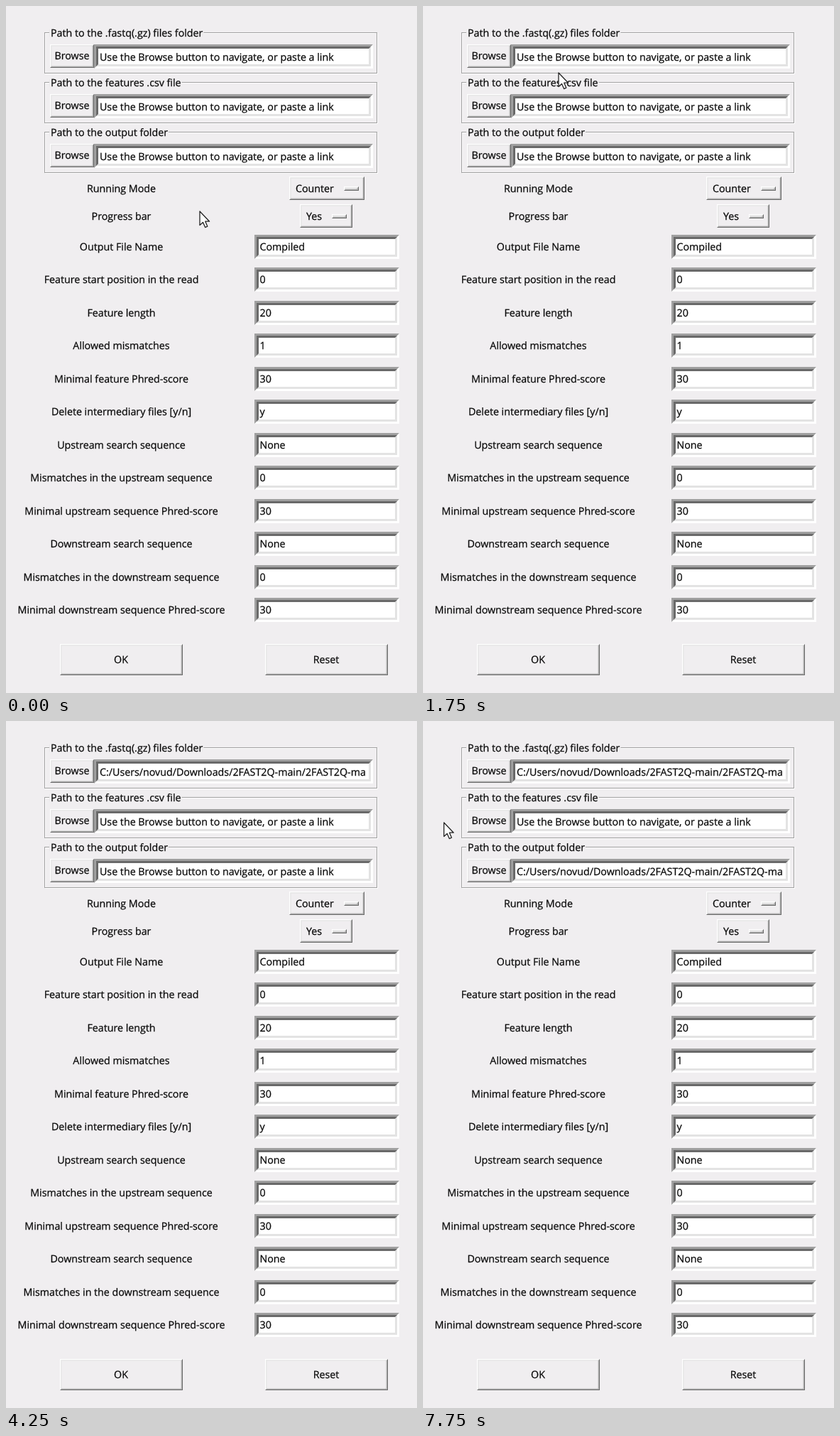
Recreate the animation shown at these times as an HTML page with a canvas. Size 579 by 967 pixels, loop 8000 ms.

```html
<!DOCTYPE html>
<html lang="en">
<head>
<meta charset="utf-8">
<style>
html, body { margin: 0; width: 579px; height: 967px; overflow: hidden; background: #f0eef0; }
canvas { display: block; }
</style>
</head>
<body>
<canvas id="stage" width="579" height="967"></canvas>
<script>
const ctx = document.getElementById('stage').getContext('2d');
const FACE = '#f0eef0', SHADOW = '#a0a0a0', DARK = '#696969', LIGHT = '#e3e3e3';
const LOOP = 8000, STEP = 125;
const HINT = 'Use the Browse button to navigate, or paste a link';
const PATH = 'C:/Users/novud/Downloads/2FAST2Q-main/2FAST2Q-ma';

const pathRows = [
  { title: 'Path to the .fastq(.gz) files folder', filledAt: 3875 },
  { title: 'Path to the features .csv file', filledAt: Infinity },
  { title: 'Path to the output folder', filledAt: 6000 }
];
const settings = [
  ['Output File Name', 'Compiled'],
  ['Feature start position in the read', '0'],
  ['Feature length', '20'],
  ['Allowed mismatches', '1'],
  ['Minimal feature Phred-score', '30'],
  ['Delete intermediary files [y/n]', 'y'],
  ['Upstream search sequence', 'None'],
  ['Mismatches in the upstream sequence', '0'],
  ['Minimal upstream sequence Phred-score', '30'],
  ['Downstream search sequence', 'None'],
  ['Mismatches in the downstream sequence', '0'],
  ['Minimal downstream sequence Phred-score', '30']
];
// Pointer tracks: [time, x, y]; the pointer is hidden outside them.
const tracks = [
  [[0, 273, 289], [1250, 273, 289], [1750, 191, 94], [2125, 95, 70], [2500, 95, 70]],
  [[6250, 327, 277], [6500, 327, 277], [6750, 319, 283], [7125, 319, 283], [7750, 29.5, 143], [8000, 29.5, 143]]
];
const arrow = new Path2D('M0 0V19.5L4.5 15.5L7.6 22.6L10.8 21.2L7.8 14.2H13.6Z');

// A hairline stroke gives the type its slightly heavy screen look.
function text(str, x, y, align = 'left') {
  ctx.textAlign = align;
  ctx.fillStyle = ctx.strokeStyle = '#080808';
  ctx.lineWidth = .25;
  ctx.fillText(str, x, y);
  ctx.strokeText(str, x, y);
}

function rect(x, y, w, h, color) {
  ctx.fillStyle = color;
  ctx.fillRect(x, y, w, h);
}

// Nested rings: [top-left colour, bottom-right colour], all of one thickness.
function bevel(x, y, w, h, size, rings, fill) {
  for (const [near, far] of rings) {
    rect(x, y, w, h, near);
    ctx.beginPath();
    ctx.moveTo(x, y + h);
    ctx.lineTo(x + size, y + h - size);
    ctx.lineTo(x + w - size, y + h - size);
    ctx.lineTo(x + w - size, y + size);
    ctx.lineTo(x + w, y);
    ctx.lineTo(x + w, y + h);
    ctx.fillStyle = far;
    ctx.fill();
    x += size; y += size; w -= 2 * size; h -= 2 * size;
  }
  rect(x, y, w, h, fill);
}

const raised = (x, y, w, h) =>
  bevel(x, y, w, h, 1.25, [['#fff', DARK], [LIGHT, SHADOW]], FACE);

const sunken = (x, y, w, h) =>
  bevel(x, y, w, h, 3, [[SHADOW, '#fff'], [DARK, LIGHT]], '#fff');

function pathRow({ title, filledAt }, i, t) {
  const y = Math.round(37.7 + i * 70.3);
  ctx.lineWidth = 1;
  ctx.strokeStyle = '#fff';
  ctx.strokeRect(55.5, y + .5, 468, 57);
  ctx.strokeStyle = SHADOW;
  ctx.strokeRect(54.5, y - .5, 468, 57);
  rect(61, y - 2, ctx.measureText(title).width + 3, 5, FACE);
  text(title, 63, y + 5);
  raised(62, y + 16, 62, 33);
  text('Browse', 93, y + 37, 'center');
  sunken(124, y + 16, 393, 34);
  ctx.save();
  ctx.beginPath();
  ctx.rect(130, y + 22, 381, 22);
  ctx.clip();
  text(t >= filledAt ? PATH : HINT, 132, y + 38.5);
  ctx.restore();
}

function menu(label, value, x, y, w) {
  text(label, 162.5, y + 5, 'center');
  raised(x, y - 17, w, 33);
  text(value, x + 9, y + 5);
  bevel(x + w - 29, y - 3, 21, 6, 1.25, [['#fff', DARK], [LIGHT, SHADOW]], FACE);
}

function button(label, x) {
  raised(x, 898, 173, 44);
  text(label, x + 86, 925, 'center');
}

function pointer(t) {
  const track = tracks.find(k => t >= k[0][0] && t < k[k.length - 1][0]);
  if (!track) return;
  const next = track.findIndex(k => k[0] > t);
  const [t0, x0, y0] = track[next - 1], [t1, x1, y1] = track[next];
  const p = (t - t0) / (t1 - t0);
  ctx.save();
  ctx.translate(x0 + (x1 - x0) * p, y0 + (y1 - y0) * p);
  ctx.lineWidth = 1.3;
  ctx.lineJoin = 'round';
  ctx.fillStyle = '#fff';
  ctx.strokeStyle = '#222';
  ctx.fill(arrow);
  ctx.stroke(arrow);
  ctx.restore();
}

function draw(now) {
  const t = Math.floor((now % LOOP + 5) / STEP) * STEP % LOOP;
  ctx.font = "14.25px 'Open Sans', 'Noto Sans', sans-serif";
  ctx.textRendering = 'geometricPrecision';
  rect(0, 0, 579, 967, FACE);
  pathRows.forEach((row, i) => pathRow(row, i, t));
  menu('Running Mode', 'Counter', 399, 257, 106);
  menu('Progress bar', 'Yes', 414, 296, 74);
  settings.forEach(([label, value], i) => {
    const y = Math.round(339 + i * 46.45);
    text(label, 162.5, y + 5, 'center');
    sunken(350, y - 17, 204, 34);
    text(value, 357.5, y + 5);
  });
  button('OK', 76);
  button('Reset', 365);
  pointer(t);
  requestAnimationFrame(draw);
}
requestAnimationFrame(draw);
</script>
</body>
</html>
```
